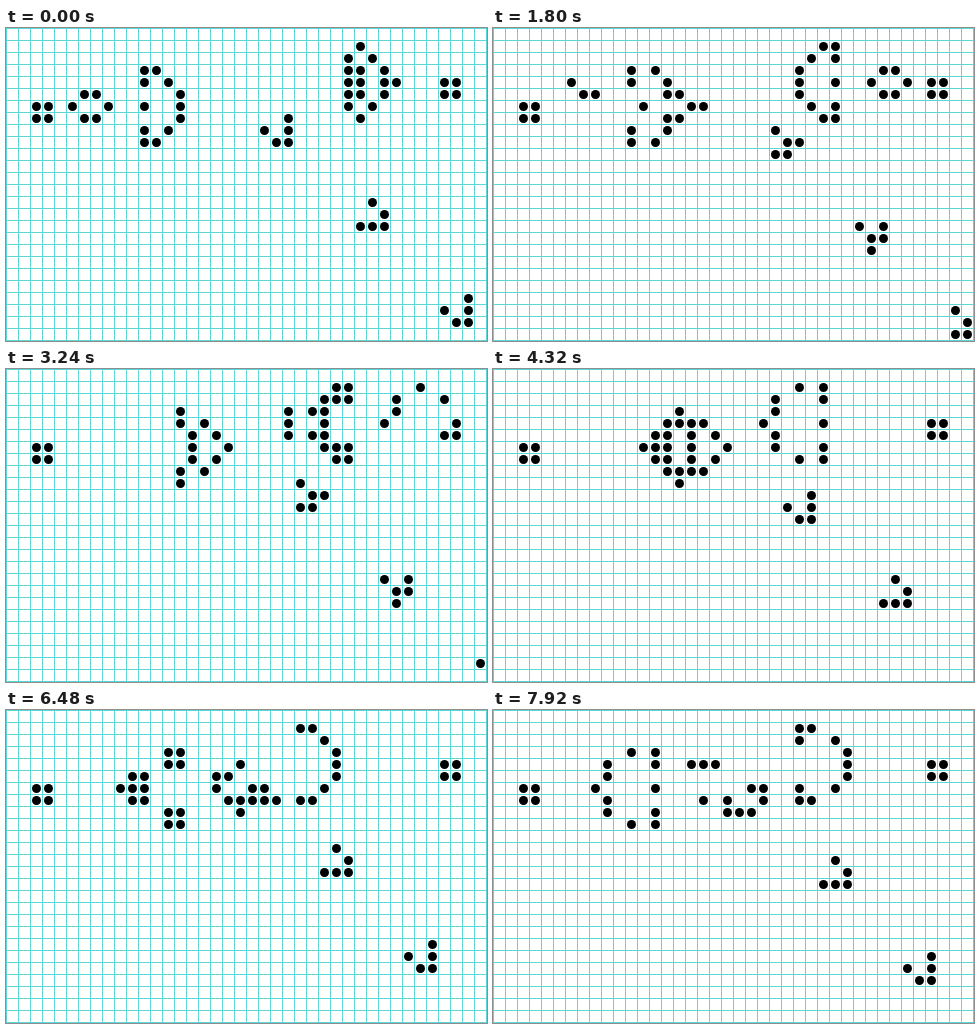
Animation of 481 by 313 pixels, one loop 8 s. Source, as an HTML page with a canvas:

```html
<!DOCTYPE html>
<html lang="en">
<head>
<meta charset="utf-8">
<title>Glider gun</title>
<style>
  html, body { margin: 0; width: 481px; height: 313px; overflow: hidden; background: #fff; }
  canvas { display: block; }
</style>
</head>
<body>
<canvas id="board" width="481" height="313"></canvas>
<script>
const CELL = 12, COLS = 40, ROWS = 26;
const STEP = 360, LOOP = 8000;
const PAD = 8; // hidden margin, so gliders leave the board cleanly
const W = COLS + 2 * PAD, H = ROWS + 2 * PAD;
const LINE = '#5cd6d6';

const index = (x, y) => (y + PAD) * W + x + PAD;
const NEAR = [-W - 1, -W, -W + 1, -1, 1, W - 1, W, W + 1];

function addBlock(world, x, y) {
  for (const i of [0, 1, W, W + 1]) world[index(x, y) + i] = 1;
}

// Queen bee: an arc with two tails; dir is the way it flies, x its tail column
function addBee(world, x, y, dir) {
  for (let dy = -3; dy <= 3; dy++) {
    const reach = 3 - Math.max(0, Math.abs(dy) - 1);
    world[index(x + dir * reach, y + dy)] = 1;
  }
  world[index(x, y - 3)] = world[index(x, y + 3)] = 1;
}

function evolve(world) {
  const next = new Uint8Array(W * H);
  for (let y = 1; y < H - 1; y++) {
    for (let x = 1; x < W - 1; x++) {
      const i = y * W + x;
      const n = NEAR.reduce((sum, d) => sum + world[i + d], 0);
      next[i] = n === 3 || (n === 2 && world[i]) ? 1 : 0;
    }
  }
  return next;
}

function advance(world, steps) {
  for (let i = 0; i < steps; i++) world = evolve(world);
  return world;
}

// Two bees, five steps apart, make the gun; then it fires three gliders
function startWorld() {
  let world = new Uint8Array(W * H);
  addBlock(world, 2, 6);
  addBlock(world, 36, 4);
  addBee(world, 10, 6, 1);
  world = advance(world, 5);
  addBee(world, 29, 4, -1);
  return advance(world, 87);
}

const worlds = [startWorld()];
while (worlds.length < Math.ceil(LOOP / STEP)) worlds.push(evolve(worlds.at(-1)));

const canvas = document.getElementById('board');
const ctx = canvas.getContext('2d');

function draw(world) {
  const { width, height } = canvas;
  ctx.fillStyle = '#fff';
  ctx.fillRect(0, 0, width, height);
  ctx.fillStyle = LINE;
  for (let x = 0; x < width; x += CELL) ctx.fillRect(x, 0, 1, height);
  for (let y = 0; y < height; y += CELL) ctx.fillRect(0, y, width, 1);

  ctx.fillStyle = '#000';
  for (let y = 0; y < ROWS; y++) {
    for (let x = 0; x < COLS; x++) {
      if (!world[index(x, y)]) continue;
      ctx.beginPath();
      ctx.arc(x * CELL + 6.5, y * CELL + 6.5, 4.5, 0, 2 * Math.PI);
      ctx.fill();
    }
  }
}

let shown = -1;
function tick() {
  const gen = Math.floor((performance.now() % LOOP) / STEP);
  if (gen !== shown) draw(worlds[shown = gen]);
  requestAnimationFrame(tick);
}
tick();
</script>
</body>
</html>
```
